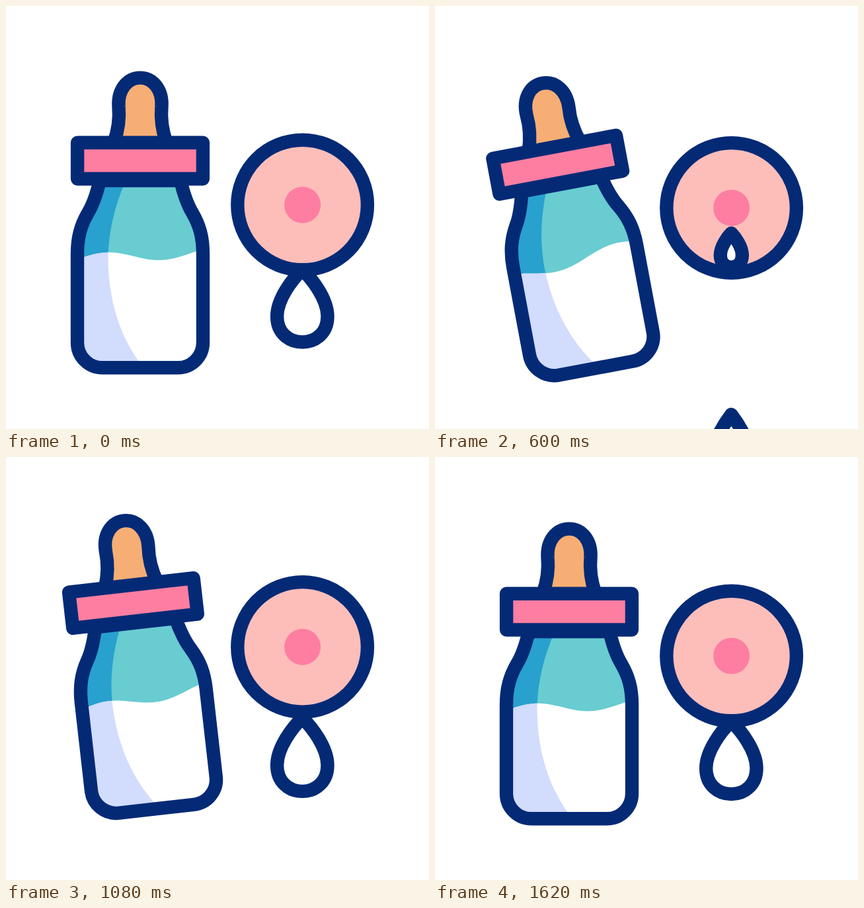
Animation, 640 px wide and 640 px high, one loop 2400 ms. Source, as an HTML page:

```html
<!DOCTYPE html>
<html lang="en">
<head>
<meta charset="utf-8">
<title>Baby bottle</title>
<style>
html, body { margin: 0; width: 100%; height: 100%; overflow: hidden; background: #fff; }
svg { display: block; width: 100%; height: 100%; }
.line { fill: none; stroke: #042a76; stroke-width: 20.4; stroke-linejoin: round; stroke-linecap: round; }
</style>
</head>
<body>
<svg viewBox="0 0 640 640">
  <defs>
    <path id="body" d="M142 264C137 285 132 300 124 313C113 332 108 350 108 375V509A38 38 0 0 0 146 547.3H260A38 38 0 0 0 298 509V375C298 350 293 332 282 313C274 300 269 285 264 264Z"/>
    <path id="shade" d="M183 260C165 300 155 340 154.5 382C155 445 172 500 206 545H90V260Z"/>
    <clipPath id="inBody"><use href="#body"/></clipPath>
    <clipPath id="inMilk"><path id="milkClip"/></clipPath>
  </defs>
  <g id="bottle">
    <path class="line" style="fill:#f6ae74" d="M163.5 206C170 187 172 168 170.5 152C169 126 184 108.6 203 108.6C222 108.6 237 126 235.5 152C234 168 236 187 242.5 206"/>
    <g clip-path="url(#inBody)">
      <rect x="98" y="250" width="210" height="310" fill="#68ccd1"/>
      <use href="#shade" fill="#28a1ce"/>
      <path id="milk" fill="#fff"/>
      <g clip-path="url(#inMilk)"><use href="#shade" fill="#d2dcfc"/></g>
    </g>
    <use href="#body" class="line"/>
    <rect class="line" style="fill:#fd7ea1" x="108.1" y="206.7" width="189.8" height="54.8"/>
  </g>
  <g id="breast">
    <circle class="line" style="fill:#fdbeba" cx="448.6" cy="301" r="98.3"/>
    <circle cx="448.6" cy="301" r="27.5" fill="#fd7ea1"/>
  </g>
  <path id="falling" class="line" style="fill:#fff"/>
  <path id="growing" class="line" style="fill:#fff"/>
</svg>
<script>
const LOOP = 2400, MOVE_END = 1620;
const PIVOT = { x: 203, y: 328 };
const set = (id, name, value) => document.getElementById(id).setAttribute(name, value);

// Smooth 0..1 ramp between two times
function ease(t, from, to) {
  const u = Math.min(1, Math.max(0, (t - from) / (to - from)));
  return u * u * (3 - 2 * u);
}

// Eased passage through [time, value] turning points
const through = (t, ...keys) => keys.slice(1).reduce(
  (sum, [time, value], i) => sum + (value - keys[i][1]) * ease(t, keys[i][0], time), keys[0][1]);

const lift = t => through(t, [0, 0], [400, -25.7], [755, 25], [1100, -14], [1352, 2.5], [1560, 0]);
const tilt = t => through(t, [83, 0], [481, -19.8], [836, 15.3], [1155, -10], [1400, 4], [1600, 0]);
const wavePhase = t => through(t, [0, 20], [520, 155], [950, 24], [1270, 67], [MOVE_END, 20]);

// One travelling sine wave on a surface that leans with the bottle
function milkPath(t, angle) {
  const half = 85, phase = wavePhase(t) * Math.PI / 180;
  let d = 'M98 560';
  for (let x = -95; x <= 95; x += 5) {
    const y = 50.2 - 0.33 * angle + (0.42 * angle - 4.5) * x / half +
      8 * Math.sin(Math.PI * x / half + phase);
    d += `L${PIVOT.x + x} ${PIVOT.y + y}`;
  }
  return d + 'L308 560Z';
}

function dropPath(tip, height, scale = 1) {
  const p = (x, y) => `${448.3 + x * scale} ${tip + y * height * scale} `;
  const side = m => [p(14 * m, 0.12), p(38.2 * m, 0.4), p(38.2 * m, 0.645),
    p(38.2 * m, 0.865), p(21 * m, 1)];
  return `M${p(0, 0)}C${side(-1).join('')}${p(0, 1)}` +
    `C${side(1).reverse().join('')}${p(0, 0)}Z`;
}

function fallingDrop(t) {
  return dropPath(399 + 466 * ease(t, 0, 1250), 109.5 + 0.067 * t);
}

function growingDrop(t, dy) {
  const grow = ease(t, 400, 960), squash = ease(t, 960, 1260), settle = ease(t, 1260, MOVE_END);
  const tip = 301 + dy + 8 + 104 * grow - 13 * squash;
  return dropPath(tip, 119 - 22.5 * squash + 13.5 * settle, 0.2 + 0.8 * grow);
}

function draw(time) {
  const t = Math.min(time, MOVE_END);
  const dy = lift(t), angle = tilt(t);
  set('bottle', 'transform', `translate(0 ${dy}) rotate(${angle} ${PIVOT.x} ${PIVOT.y})`);
  set('breast', 'transform', `translate(0 ${dy})`);

  const milk = milkPath(t, angle);
  set('milk', 'd', milk);
  set('milkClip', 'd', milk);

  set('falling', 'd', t < 700 ? fallingDrop(t) : '');
  set('growing', 'd', t > 440 ? growingDrop(t, dy) : '');
}

let start = null;
function tick(now) {
  if (start === null) start = now;
  draw(Math.max(0, now - start) % LOOP);
  requestAnimationFrame(tick);
}
draw(0);
requestAnimationFrame(tick);
</script>
</body>
</html>
```
